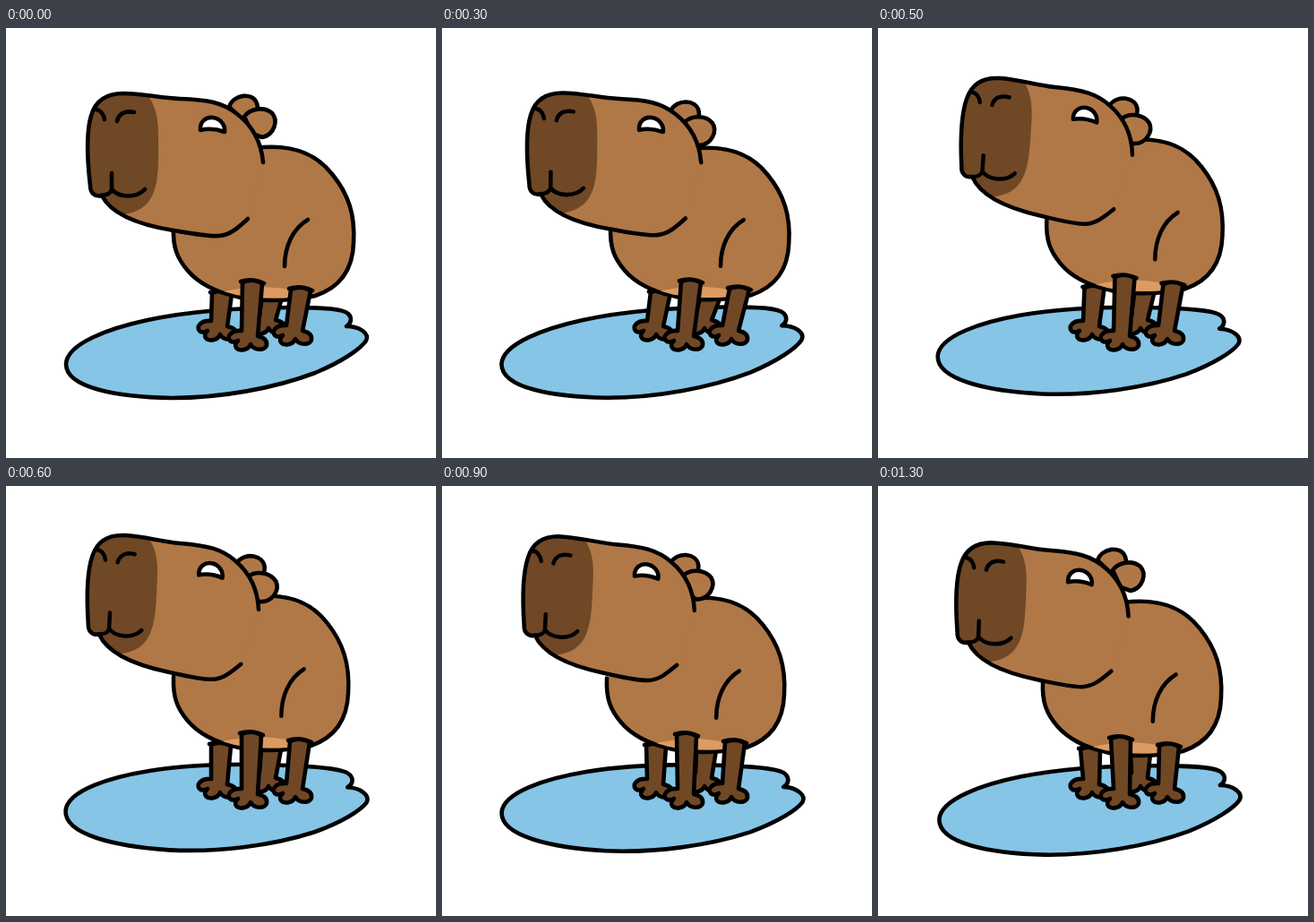
Recreate the animation shown at these times as an HTML page. Size 480 px wide and 480 px high, loop 1.4 s.

```html
<!DOCTYPE html>
<html lang="en">
<head>
<meta charset="utf-8">
<title>Capybara</title>
<style>
  html, body { margin: 0; width: 100%; height: 100%; overflow: hidden; background: #fff; }
  svg { display: block; width: 100%; height: 100%; }
  .line { fill: none; }
  .fur { fill: #b07846; }
  .dark { fill: #704825; }
  .bare { stroke: none; }
</style>
</head>
<body>
<svg viewBox="0 0 480 480" stroke="#000" stroke-width="4.6" stroke-linecap="round" stroke-linejoin="round">
  <defs>
    <path id="skull" d="M270 213C258 224 250 231 238 232C225 233 205 229 187 226C150 220 118 209 107 187C99 189 94 184 94 176C91 150 89 118 95 98C100 80 113 73 131 73C152 73 172 78 194 79C225 80 242 83 258 96C275 109 285 128 287 150"/>
    <clipPath id="skullClip"><use href="#skull"/></clipPath>
  </defs>

  <path id="pool" fill="#86c5e6" d="M67 375C68 352 116 335 158 326C210 315 270 312 320 312C352 312 376 313 382 319C387 324 385 330 380 333C395 333 406 341 402 349C396 358 376 372 345 385C300 402 240 413 185 413C125 412 67 402 67 375Z"/>

  <g id="backLegs" class="dark"></g>

  <g id="body">
    <path id="torso" class="fur" d="M278 134C318 129 345 139 364 163C382 185 390 208 388 240C387 270 372 290 345 299C320 305 275 306 255 299C235 295 215 285 203 271C191 257 186 245 187 222"/>
    <path class="bare" fill="#dc9b62" d="M243 294Q283 285 322 293L318 301Q285 303 257 298Z"/>
    <path class="line" d="M337 214C320 224 311 244 311 266"/>
  </g>

  <g id="frontLegs" class="dark"></g>

  <g id="ears" class="fur">
    <path d="M249 88C254 74 275 71 280 84C283 93 278 105 268 106Z"/>
    <path d="M266 99C272 90 288 87 297 95C304 103 300 119 286 122L275 118Z"/>
  </g>

  <g id="head">
    <use href="#skull" class="fur bare"/>
    <path class="dark bare" clip-path="url(#skullClip)" d="M148 66C165 78 170 95 170 120C170 140 171 165 166 180C160 200 145 208 122 209L80 200V60Z"/>
    <use href="#skull" class="line"/>
    <path class="line" d="M118 162V180C117 185 111 187 105 187M118 180C126 190 146 190 155 180M124 104C126 95 134 92 143 94M100 91C105 91 109 96 110 102"/>
    <path fill="#fff" d="M217 114C216 104 224 99 231 100C239 101 245 108 244 116C236 113 225 112 217 114Z"/>
  </g>
</svg>

<script>
const STEP = 100, LOOP = 1400, POSES = 13;
const keyAt = [0, 1, 3, 5, 8, 10, 12];

const tracks = {
  // left, right, top, bottom
  body: [[187, 389, 132, 304], [187, 388, 138, 307], [189, 388, 127, 299], [187, 383, 122, 295],
         [184, 383, 124, 297], [184, 384, 125, 298], [184, 384, 128, 301]],
  // dx, dy, angle, scale
  head: [[0, 0, 0, 1], [3, 7.5, -3, 1], [2, -10, 4, .985], [-2.5, -16.5, 2.8, .98],
         [-2.7, -15.3, 2.7, .98], [-4.7, -12.3, 2.5, .985], [-5.5, -8.3, 2.3, .985]],
  ears: [[0, 0, 0, 1], [2, 9, 4, 1], [6, 5.5, 12, 1], [4, 5, 18, 1],
         [3, 3, 12, 1], [0, -2, 5, 1], [-4, -5, 0, 1]],
  pool: [[0, 0, 0, 1], [-1, 0, -1, 1], [0, -1, 1, 1], [0, -4, 2.9, 1],
         [0, -3.4, 2.5, 1], [1, -2, 1.5, 1], [1.5, -.7, .7, 1]],
  // top of the nearest leg
  hip: [[275, 283], [278, 285], [277, 279], [274, 276], [273, 277], [271, 279], [271, 281]]
};
const pivots = { head: [190, 140], ears: [276, 100], pool: [236, 362] };

// foot offset, hip offset
const legs = [
  { group: "backLegs", foot: [20, -18], hip: [22, 16] },
  { group: "backLegs", foot: [-34, -11], hip: [-34, 12] },
  { group: "frontLegs", foot: [50, -6], hip: [54, 8] },
  { group: "frontLegs", foot: [0, 0], hip: [0, 0] }
];

const byId = id => document.getElementById(id);
for (const leg of legs) {
  leg.path = document.createElementNS("http://www.w3.org/2000/svg", "path");
  leg.path.setAttribute("transform", `translate(${leg.foot})`);
  byId(leg.group).append(leg.path);
}

// Smooth periodic curve through the key poses
function sample(keys, pose) {
  const n = keys.length;
  const when = i => keyAt[(i + n) % n] + POSES * Math.floor(i / n);
  const value = (i, c) => keys[(i + n) % n][c];
  const slope = (i, c) => (value(i + 1, c) - value(i - 1, c)) / (when(i + 1) - when(i - 1));
  let k = n - 1;
  while (keyAt[k] > pose) k--;
  const span = when(k + 1) - when(k), u = (pose - when(k)) / span, v = 1 - u;
  return keys[0].map((_, c) =>
    v * v * (1 + 2 * u) * value(k, c) + u * u * (3 - 2 * u) * value(k + 1, c) +
    span * u * v * (v * slope(k, c) - u * slope(k + 1, c)));
}

function legPath(x, y) {
  return `M${x - 11} ${y + 1}L263 338C251 337 246 345 250 349C252 351 256 351 259 349` +
    "C252 356 259 361 266 359C270 358 272 356 273 353C277 361 290 360 291 354C292 347 286 345 281 344" +
    `L${x + 11} ${y + 2}Q${x} ${y - 4} ${x - 11} ${y + 1}` +
    `M${x - 13} ${y}Q${x} ${y - 4} ${x + 13} ${y + 2}`;
}

function draw(time) {
  const pose = Math.max(0, Math.floor(time % LOOP / STEP) - 1);

  for (const id in pivots) {
    const [dx, dy, angle, scale] = sample(tracks[id], pose), [px, py] = pivots[id];
    byId(id).setAttribute("transform",
      `translate(${px + dx} ${py + dy}) rotate(${angle}) scale(${scale}) translate(${-px} ${-py})`);
  }

  const [left, right, top, bottom] = sample(tracks.body, pose);
  const [left0, right0, top0, bottom0] = tracks.body[0];
  byId("body").setAttribute("transform",
    `translate(${left} ${top}) scale(${(right - left) / (right0 - left0)} ${(bottom - top) / (bottom0 - top0)}) translate(${-left0} ${-top0})`);

  const [hipX, hipY] = sample(tracks.hip, pose);
  for (const { path, foot, hip } of legs)
    path.setAttribute("d", legPath(hipX + hip[0] - foot[0], hipY + hip[1] - foot[1]));
}

const start = performance.now();
function tick() {
  draw(performance.now() - start);
  requestAnimationFrame(tick);
}
tick();
</script>
</body>
</html>
```
